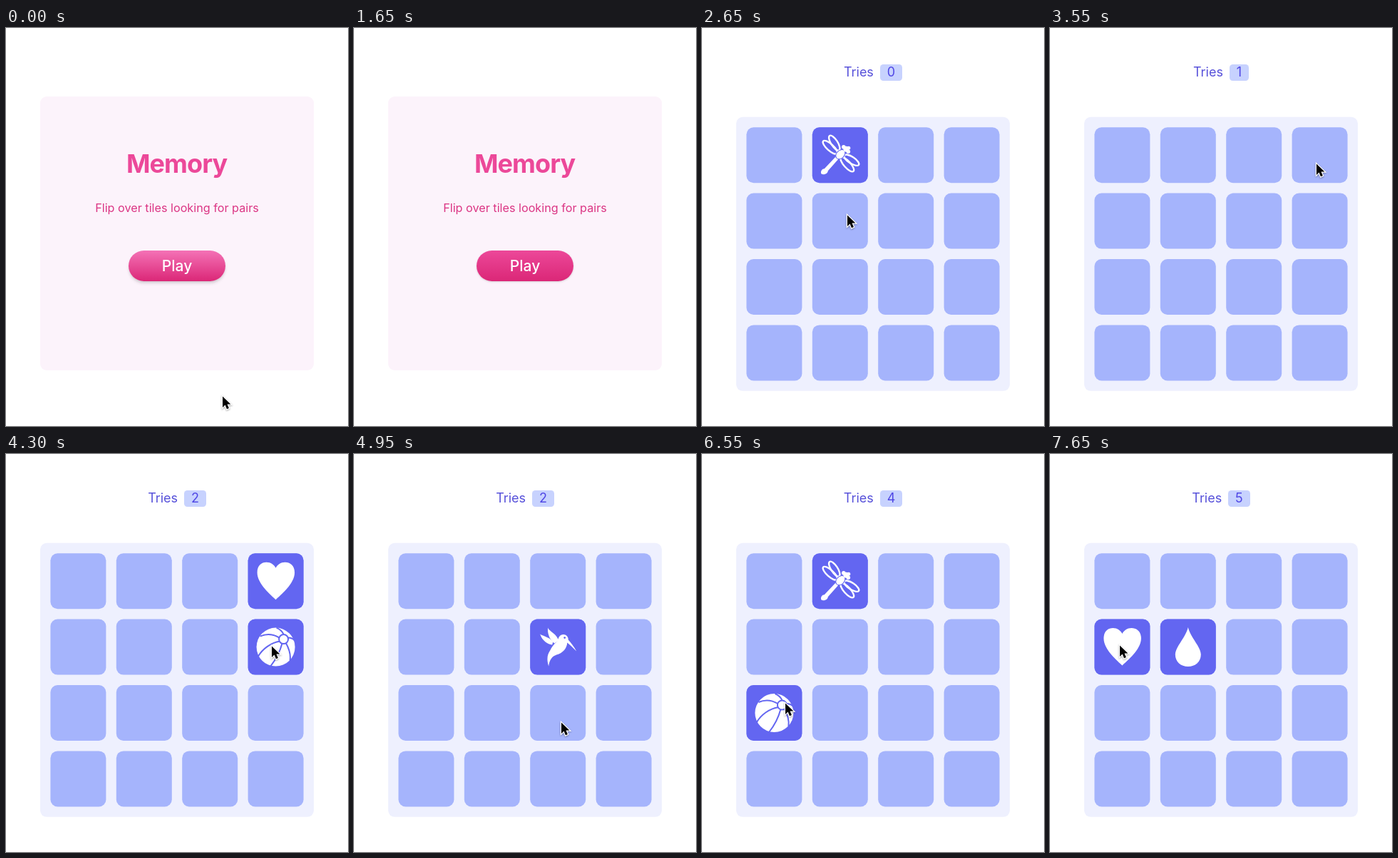
An HTML page for the animation above (8000 ms loop, 480x558 px).

```html
<!DOCTYPE html>
<html lang="en">
<head>
<meta charset="utf-8">
<title>Memory</title>
<style>
  html, body { margin: 0; width: 100%; height: 100%; overflow: hidden; background: #fff; }
  body { position: relative; font-family: Inter, Roboto, sans-serif; }
  svg { position: absolute; left: 0; top: 0; display: block; }
  .tries {
    position: absolute; left: 0; top: 51px; width: 480px;
    display: flex; justify-content: center;
    font-size: 18px; line-height: 22.5px; color: #5751da;
  }
  .tries b {
    margin-left: 9px; padding: 0 9.9px; border-radius: 4.5px;
    background: #c7d2fe; color: #4f46e5; font-weight: 400;
  }
  .play {
    position: absolute; left: 172px; top: 312px; width: 136px; height: 43.2px;
    border-radius: 22px; text-align: center; color: #fff;
    font-size: 21px; line-height: 43.2px; font-weight: 500;
    background: linear-gradient(#f472b6, #db2777);
    box-shadow: 0 3.6px 5.4px -1px rgba(0,0,0,.14), 0 1.8px 3.6px -1px rgba(0,0,0,.1);
  }
  .play.pressed {
    background: linear-gradient(#ec4899, #db2777);
    box-shadow: 0 1px 2.7px rgba(0,0,0,.16);
  }
  .title { font-size: 36px; font-weight: 700; letter-spacing: -.9px; fill: #ec4899; }
  .hint { font-size: 16.2px; fill: #db3584; }
  [hidden] { display: none !important; }
</style>
</head>
<body>
<div id="start">
  <svg width="480" height="558">
    <rect x="48" y="96" width="384" height="384" rx="9" fill="#fcf3fb"/>
    <g text-anchor="middle">
      <text class="title" x="239.6" y="203">Memory</text>
      <text class="hint" x="240" y="258">Flip over tiles looking for pairs</text>
    </g>
  </svg>
  <div class="play" id="play">Play</div>
</div>

<div id="game" hidden>
  <div class="tries">Tries<b id="count">0</b></div>
  <svg width="480" height="558">
    <defs>
      <g id="heart"><path d="M39 65C33 59 13 43 13 27C13 17 19 12.5 26 12.5C32 12.5 36.5 16 39 20.5C41.5 16 46 12.5 52 12.5C59 12.5 65.5 17 65.5 27C65.5 43 45 59 39 65Z"/></g>
      <g id="drop"><path d="M39 11.5C36 25 21 39 21 49.5C21 60 29 66.5 39 66.5C49 66.5 57 60 57 49.5C57 39 42 25 39 11.5Z"/></g>
      <g id="ball">
        <circle cx="39" cy="39" r="27"/>
        <g fill="none" stroke="#6366f1" stroke-width="2">
          <path d="M44 26C34 20 24 21 17 24M45 31C32 33 20 42 14.5 52M48 34C45 45 38 58 32 65.500M53 33C58 42 60 52 59 58M56 26C60 26 63 27 65.500 30M50 21C48 17 45 14 40 12"/>
          <circle cx="50" cy="28" r="6.500" fill="#fff"/>
        </g>
      </g>
      <g id="wings" fill="none" stroke="#fff" stroke-width="2.4">
        <ellipse rx="13" ry="4.600" transform="translate(25 28) rotate(42)"/>
        <ellipse rx="12.200" ry="4.600" transform="translate(31 22) rotate(57)"/>
      </g>
      <g id="dragonfly">
        <use href="#wings"/>
        <use href="#wings" transform="matrix(0 -1 -1 0 77 77)"/>
        <path d="M34 40L37.500 43.500L22 61C22 65 16 67 13 65.500C11 63 13 58 17 58Z"/>
        <ellipse rx="7.500" ry="5.500" transform="translate(39.500 38) rotate(-45)" stroke="#6366f1"/>
        <circle cx="47.500" cy="30.500" r="4"/>
        <circle cx="44" cy="27.500" r="2.800"/>
        <circle cx="50.500" cy="34" r="2.800"/>
        <circle cx="51" cy="29" r="2.500"/>
      </g>
      <g id="bird">
        <path d="M44 22C49 20 54 24 53.500 29C57 33 62 39 65 45C60 40 56 36 52 33C52 40 46 48 37 50C31 52 27 57 26 66C23 56 24 50 28 44C30 40 33 35 38 31C40 26 41 23 44 22Z"/>
        <path d="M25 12C26 17 37 20 40 30L34 34C27 28 24 20 25 12Z"/>
        <path d="M14 21C18 24 28 25 32 32L31 36C24 35 17 30 14 21Z"/>
        <circle cx="48.500" cy="26" r="1.400" fill="#6366f1"/>
      </g>
    </defs>
    <rect x="48" y="124.8" width="384" height="384" rx="9" fill="#eef0fe"/>
    <g id="tiles"></g>
  </svg>
</div>

<svg width="480" height="558">
  <g id="cursor" style="filter: drop-shadow(0 1px 1px rgba(0,0,0,.35))">
    <path d="M1 1.500V17L4.600 13.600L7 19.300L9.900 18L7.500 12.500H12.400Z" stroke="#fff" stroke-width="2.400" paint-order="stroke"/>
  </g>
</svg>

<script>
const LOOP = 8000, TICK = 50;
const GAME_START = 1700, PRESS = 1300;
const $ = id => document.getElementById(id);

// Pointer legs: start, end, destination x, y
const legs = [
  [550, 1000, 275, 340],
  [2000, 2300, 212, 187],
  [2450, 2650, 203, 261],
  [3200, 3550, 373, 189],
  [3700, 3950, 372, 268],
  [4450, 4750, 286, 270],
  [4800, 4950, 290, 375],
  [5500, 5900, 208, 187],
  [6050, 6500, 116, 348],
  [6800, 7000, 208, 269],
  [7350, 7550, 97, 267]
];

// Face-up tiles: row, column, icon, shown from, until
const flips = [
  [0, 1, "dragonfly", 2450, 3350],
  [1, 1, "drop", 2750, 3350],
  [0, 3, "heart", 3700, 4600],
  [1, 3, "ball", 4000, 4600],
  [1, 2, "bird", 4800, 5650],
  [2, 2, "drop", 5050, 5650],
  [0, 1, "dragonfly", 6000, 7150],
  [2, 0, "ball", 6550, 7150],
  [1, 1, "drop", 7350, LOOP],
  [1, 0, "heart", 7650, LOOP]
];
const tries = [2750, 4000, 5050, 6550, 7650];

function addTile(row, col, color, icon) {
  const g = document.createElementNS("http://www.w3.org/2000/svg", "g");
  g.setAttribute("transform", `translate(${62.4 + col * 92.4} ${139.2 + row * 92.4})`);
  g.innerHTML = `<rect width="78" height="78" rx="10" fill="${color}"/>` +
    (icon ? `<use href="#${icon}" fill="#fff"/>` : "");
  $("tiles").append(g);
  return g;
}

for (let i = 0; i < 16; i++) addTile(i >> 2, i % 4, "#a5b4fc");
const faces = flips.map(([row, col, icon, from, to]) =>
  ({ node: addTile(row, col, "#6366f1", icon), from, to }));

function pointerAt(t) {
  let x = 303, y = 515;
  for (const [from, to, nx, ny] of legs) {
    if (t <= from) break;
    const p = Math.min(1, (t - from) / (to - from));
    const k = p * p * (3 - 2 * p);
    x += (nx - x) * k;
    y += (ny - y) * k;
  }
  return [x, y];
}

function render(t) {
  const playing = t >= GAME_START;
  $("start").hidden = playing;
  $("game").hidden = !playing;
  $("play").classList.toggle("pressed", t >= PRESS);
  $("count").textContent = tries.filter(at => t >= at).length;
  for (const { node, from, to } of faces)
    node.style.display = t >= from && t < to ? "" : "none";

  const [x, y] = pointerAt(t);
  const overButton = !playing && y < 354;
  $("cursor").setAttribute("transform", `translate(${x} ${y})`);
  $("cursor").style.display = overButton ? "none" : "";
}

const began = performance.now();
function frame() {
  const t = (performance.now() - began) % LOOP;
  render(Math.floor(t / TICK) * TICK);
  requestAnimationFrame(frame);
}
frame();
</script>
</body>
</html>
```
